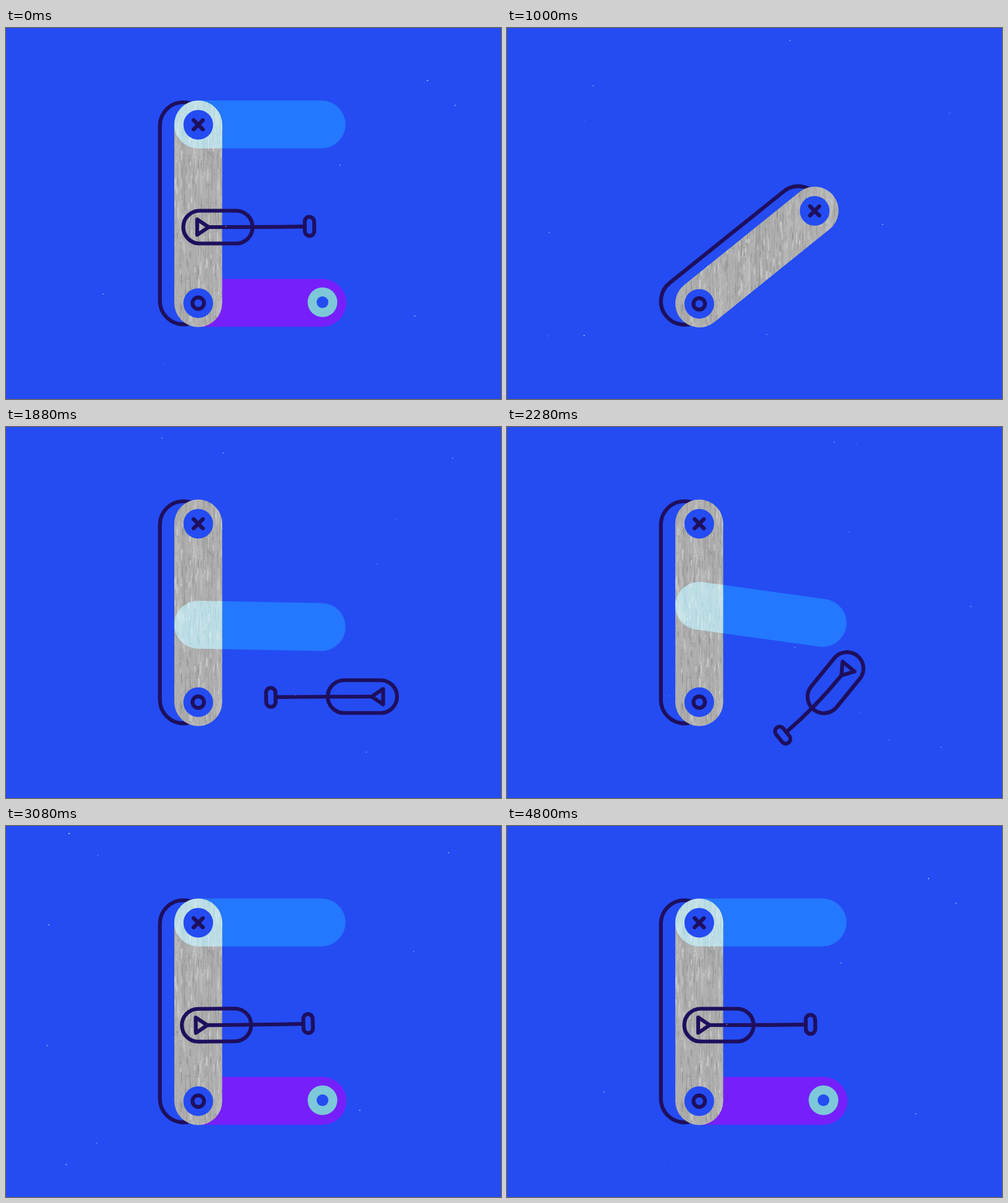
Write an HTML page with a canvas that moves like this. It is 800 by 600 pixels and loops after 4.88 s.

```html
<!DOCTYPE html>
<html lang="en">
<head>
<meta charset="utf-8">
<title>Letter E</title>
<style>
html, body { margin: 0; width: 100%; height: 100%; overflow: hidden; background: #244cf2; }
canvas { display: block; width: 800px; height: 600px; }
</style>
</head>
<body>
<canvas id="stage" width="800" height="600"></canvas>
<script>
const LOOP = 4880, STEP = 40;
const BG = '#244cf2', INK = '#1e0f5e', BLUE = '#2478ff', PURPLE = '#761ffa', MINT = '#7cc8d8';
const R = 38.7;
const ctx = document.getElementById('stage').getContext('2d');

function seeded(seed) {
  let s = seed * 2654435761 >>> 0;
  return () => {
    s = s + 0x6d2b79f5 >>> 0;
    let x = Math.imul(s ^ s >>> 15, s | 1);
    x ^= x + Math.imul(x ^ x >>> 7, x | 61);
    return ((x ^ x >>> 14) >>> 0) / 4294967296;
  };
}

const lerp = (a, b, p) => a + (b - a) * p;
const span = (t, a, b) => Math.min(1, Math.max(0, (t - a) / (b - a)));
const inOut = p => p < .5 ? 4 * p ** 3 : 1 - 4 * (1 - p) ** 3;
const move = (t, a, b) => inOut(span(t, a, b));

// Smooth curve through [time, value] keys, without overshoot between them.
function track(keys, t) {
  const n = keys.length - 1;
  if (t <= keys[0][0]) return keys[0][1];
  if (t >= keys[n][0]) return keys[n][1];
  const rate = i => (keys[i + 1][1] - keys[i][1]) / (keys[i + 1][0] - keys[i][0]);
  const slope = i => {
    if (i === 0) return rate(0);
    if (i === n) return 0;
    const a = rate(i - 1), b = rate(i);
    return a * b <= 0 ? 0 : 2 * a * b / (a + b);
  };
  let i = 0;
  while (keys[i + 1][0] < t) i++;
  const [t0, v0] = keys[i], [t1, v1] = keys[i + 1];
  const d = t1 - t0, p = (t - t0) / d, q = 1 - p;
  return v0 * (1 + 2 * p) * q * q + slope(i) * d * p * q * q
       + v1 * p * p * (3 - 2 * p) - slope(i + 1) * d * p * p * q;
}

const OAR = {
  x: [[1100, 940], [1280, 832], [1880, 576], [2240, 535], [2600, 497], [2840, 368], [3000, 338], [3160, 342.5]],
  y: [[1920, 436], [2240, 418], [2600, 349], [2840, 323], [2960, 322]],
  turn: [[2040, 180], [2320, 120], [2600, 46.4], [2840, 4], [2960, -3], [3120, 0]],
  reach: [[2040, 148], [2600, 95], [2920, 152], [3080, 148]],
  bend: [[2040, -1], [2500, 20], [2600, 20], [2880, -3], [3040, -1]]
};

function capsule(x1, y1, x2, y2, r) {
  const a = Math.atan2(y2 - y1, x2 - x1), h = Math.PI / 2;
  ctx.beginPath();
  ctx.arc(x1, y1, r, a + h, a - h);
  ctx.arc(x2, y2, r, a - h, a + h);
  ctx.closePath();
}

function disc(x, y, r, color) {
  ctx.beginPath();
  ctx.arc(x, y, r, 0, 7);
  ctx.fillStyle = color;
  ctx.fill();
}

function line(...pts) {
  ctx.beginPath();
  pts.forEach(([x, y], i) => i ? ctx.lineTo(x, y) : ctx.moveTo(x, y));
}

// Weathered grain: broad tones, long cracks, peeled flakes, fine speckle.
function makeWood() {
  const c = document.createElement('canvas');
  c.width = 400;
  c.height = 440;
  const g = c.getContext('2d'), rnd = seeded(5);
  g.fillStyle = '#b0b0b0';
  g.fillRect(0, 0, 400, 440);
  const streaks = (count, low, high, w, h, alpha) => {
    for (let i = 0; i < count; i++) {
      const v = Math.round(lerp(low, high, rnd()));
      g.fillStyle = `rgba(${v},${v},${v},${alpha})`;
      g.beginPath();
      g.ellipse(rnd() * 400, rnd() * 440, w * (.3 + rnd()), h * (.2 + rnd()), (rnd() - .5) * .05, 0, 7);
      g.fill();
    }
  };
  streaks(200, 150, 210, 5, 80, .3);
  streaks(900, 110, 150, .5, 28, .4);
  streaks(1800, 115, 155, .6, 8, .5);
  streaks(700, 198, 216, 1.4, 9, .65);
  streaks(9000, 115, 215, .5, 1.2, .6);
  return c;
}
const wood = makeWood();

function drawDust(t) {
  const rnd = seeded(Math.floor(t % 2400 / 60) + 11);
  for (let i = 0; i < 10; i++) {
    const x = rnd() * 798, y = 7 + rnd() * 555, s = .8 + rnd() * .9;
    ctx.fillStyle = `rgba(225,235,255,${.4 + rnd() * .5})`;
    ctx.fillRect(x, y, s * (.8 + rnd() * .6), s);
  }
}

function bluePose(t) {
  if (t < 520) {
    const y = 156 + 500 * span(t, 40, 520) ** 2;
    return [310.5, y, 510, y, R];
  }
  const grow = move(t, 940, 1220);
  if (!grow) return null;
  const rise = d => 444.7 - 125 * move(t, 1380 + d, 1880 + d) - 163.7 * move(t, 2100 + d, 2600 + d);
  return [310.5, rise(0), lerp(310.5, 510, grow), rise(98), R * Math.min(1, grow * 3)];
}

function drawPurple(t) {
  const out = t < 1000 ? 1 - move(t, 40, 380) : move(t, 2322, 2822);
  if (!out) return;
  const x = lerp(311, 511.5, out);
  capsule(311, 444.5, x, 444.5, R);
  ctx.fillStyle = PURPLE;
  ctx.fill();
  disc(x, 443.5, 24, MINT);
  disc(x, 443.5, 9.5, BG);
}

function drawPlank(t, blue) {
  const flat = t < 700 ? move(t, 80, 520) : 1 - move(t, 800, 1220);
  const a = (flat - 1) * Math.PI / 2, len = lerp(289, 202, flat);
  const x = 310.7, y = 445 + flat;
  const ex = x + Math.cos(a) * len, ey = y + Math.sin(a) * len;
  const hole = y + flat;

  capsule(x - 24, y - 3.7, ex - lerp(24, 28, flat), ey + lerp(2, -3.7, flat), 38);
  ctx.stroke();

  if (blue) {
    capsule(...blue);
    ctx.fillStyle = BLUE;
    ctx.fill();
  }

  ctx.save();
  capsule(x, y, ex, ey, R);
  ctx.clip();
  ctx.drawImage(wood, 220, 80);
  if (blue) {
    ctx.globalCompositeOperation = 'screen';
    capsule(...blue);
    ctx.fillStyle = 'rgb(50,150,172)';
    ctx.fill();
  }
  ctx.restore();

  disc(ex, ey + .5, 24, BG);
  disc(x, hole, 24, BG);
  ctx.beginPath();
  ctx.arc(x, hole, 9.3, 0, 7);
  ctx.stroke();
  for (const s of [-1, 1]) {
    line([ex - 7.5, ey + .5 - 7.5 * s], [ex + 7.5, ey + .5 + 7.5 * s]);
    ctx.stroke();
  }
}

function drawOar(t) {
  let x, y, turn, reach = 148, bend = -1;
  if (t < 600) {
    const p = span(t, 40, 520);
    x = 342.5;
    y = 322 + 420 * p * p;
    turn = -25 * p * p;
  } else {
    [x, y, turn, reach, bend] = ['x', 'y', 'turn', 'reach', 'bend'].map(k => track(OAR[k], t));
  }
  if (y > 700 || x > 939) return;

  ctx.save();
  ctx.translate(x, y);
  ctx.rotate(turn * Math.PI / 180);
  capsule(-29.5, 0, 29.5, 0, 26.5);
  ctx.stroke();
  line([-33.5, -12.5], [-33.5, 12.5], [-15, 0]);
  ctx.closePath();
  ctx.stroke();

  const tilt = bend * .0168;
  const ex = reach - 8 * Math.cos(tilt), ey = bend - 8 * Math.sin(tilt);
  ctx.beginPath();
  ctx.moveTo(-15, 0);
  ctx.quadraticCurveTo(lerp(-15, ex, .52), 0, ex, ey);
  ctx.stroke();

  ctx.translate(reach, bend);
  ctx.rotate(tilt);
  capsule(0, -8, 0, 7.5, 7.6);
  ctx.stroke();
  ctx.restore();
}

function draw(t) {
  ctx.fillStyle = BG;
  ctx.fillRect(0, 0, 800, 600);
  ctx.strokeStyle = INK;
  ctx.lineWidth = 6.2;
  ctx.lineCap = ctx.lineJoin = 'round';
  drawPurple(t);
  drawPlank(t, bluePose(t));
  drawOar(t);
  drawDust(t);
}

const start = performance.now();
function tick(now) {
  const t = Math.max(0, now - start) % LOOP;
  draw(Math.floor(t / STEP) * STEP);
  requestAnimationFrame(tick);
}
draw(0);
requestAnimationFrame(tick);
</script>
</body>
</html>
```
